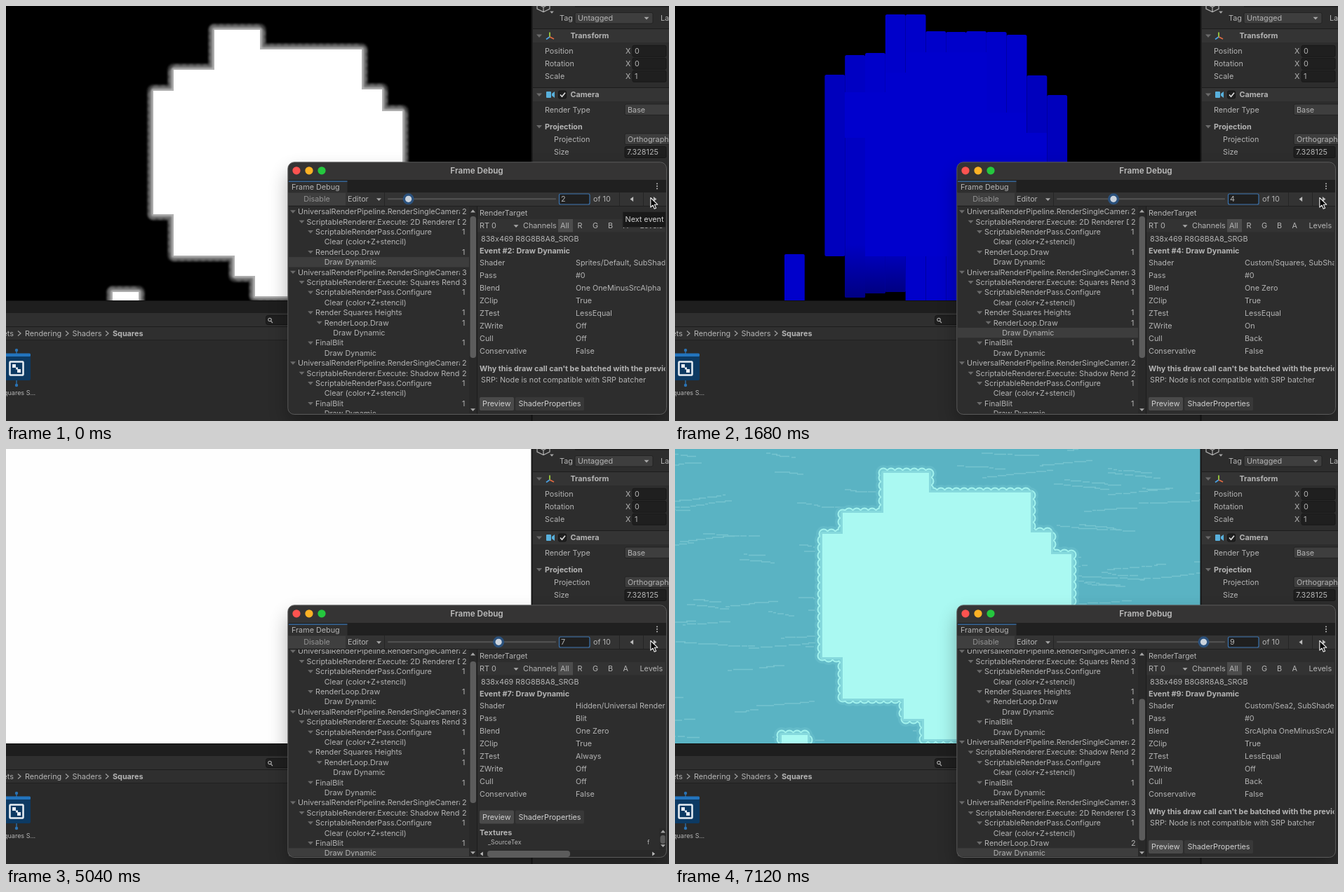
An HTML page that plays this animation: 945 by 592 pixels, repeating every 8 s.

```html
<!DOCTYPE html>
<html lang="en">
<head>
<meta charset="utf-8">
<title>Frame Debug</title>
<style>
html, body { margin: 0; width: 100%; height: 100%; overflow: hidden; background: #000; }
svg { display: block; width: 945px; height: 592px; }
text { font: 10.8px Inter, "Liberation Sans", sans-serif; fill: #b4b4b4; white-space: pre; }
.b { font-weight: 700; }
</style>
</head>
<body>
<svg id="stage" viewBox="0 0 945 592" xmlns="http://www.w3.org/2000/svg"></svg>
<script>
const LOOP = 8000, ROW = 14.4;
const stage = document.getElementById('stage');

// Drawing helpers; text is placed by the middle of its line.
const esc = s => String(s).replace(/&/g, '&amp;').replace(/</g, '&lt;');
const text = (x, y, s, attr = '') => `<text x="${x}" y="${y + 3.9}" ${attr}>${esc(s)}</text>`;
const bold = (x, y, s) => text(x, y, s, 'class="b"');
const rect = (x, y, w, h, fill, attr = '') =>
  `<rect x="${x}" y="${y}" width="${w}" height="${h}" fill="${fill}" ${attr}/>`;
const path = (d, attr) => `<path d="${d}" ${attr}/>`;
const dot = (x, y, r, fill) => `<circle cx="${x}" cy="${y}" r="${r}" fill="${fill}"/>`;
const down = (x, y, r = 3.5, c = '#a8a8a8') => path(`M${x - r} ${y - r / 2}h${2 * r}l${-r} ${r * 1.1}z`, `fill="${c}"`);
const up = (x, y) => path(`M${x - 3.5} ${y + 2}h7l-3.5 -4z`, 'fill="#a8a8a8"');
const side = (x, y, d, r = 3.5) => path(`M${x - d * r * .6} ${y - r}v${2 * r}l${d * r * 1.3} ${-r}z`, 'fill="#bcbcbc"');
const fold = (x, y) => down(x, y, 4, '#6b6b6b');
const clip = (id, x, y, w, h) => `<clipPath id="${id}">${rect(x, y, w, h, '#000')}</clipPath>`;
const field = (x, y, w, s) =>
  rect(x, y - 8, w, 16, '#1f1f1f', 'rx="2" stroke="#181818"') + text(x + 3, y, s);
const drop = (x, y, w, s) =>
  rect(x, y - 8, w, 15.5, '#3e3e3e', 'rx="2" stroke="#232323"') + text(x + 4, y, s);

function random(seed) {
  return () => {
    seed = seed + 0x6D2B79F5 | 0;
    let t = Math.imul(seed ^ seed >>> 15, 1 | seed);
    t = t + Math.imul(t ^ t >>> 7, 61 | t) ^ t;
    return ((t ^ t >>> 14) >>> 0) / 4294967296;
  };
}

// Scene pictures
const ISLAND = 'M297 34H362V62H507V119H536V150H565V414H355V385H326V356H239V297H210V121H239V91H297Z' +
  'M152 408H189V440H152Z';
const ring = (w, c, gap, attr = '') => path(ISLAND,
  `fill="none" stroke="${c}" stroke-width="${w}" stroke-linejoin="round" ` +
  (gap ? `stroke-linecap="round" stroke-dasharray="0 ${gap}" ` : '') + attr);
const backdrop = c => rect(0, 0, 750, 421, c);

function mask() {
  return backdrop('#000') + ring(17, '#3c3c3c', 0, 'filter="url(#soft)"') +
    ring(15, '#6a6a6a', 10, 'filter="url(#soft)"') + ring(6, '#b4b4b4', 0, 'filter="url(#soft)"') +
    path(ISLAND, 'fill="#fff"');
}

function heights() {
  const tops = [98, 70, 67, 12, 12, 36, 37, 36, 37, 41, 99, 127];
  const ends = [357, 416, 410, 408];
  const tint = i => i === 0 || i > 9 ? '#0000bd' : i === 1 ? '#0000c3' : '#0000ca';
  let s = backdrop('#000') + rect(156, 354, 28.8, 80, '#0000cb', 'rx="2"');
  tops.forEach((y, i) => {
    const x = 213.4 + i * 28.8, end = ends[i] || 440;
    s += rect(x, y, 28.9, end - y, tint(i), 'rx="2.5"');
    if (i > 0 && ends[i]) s += rect(x, 340, 28.9, end - 340, 'url(#deep)', 'rx="2"');
  });
  return s + path('M242 188V123H300V95H329V66H444V152H501V181H530V357H271V188Z', 'fill="#0000cd"');
}

function sea() {
  const rnd = random(7);
  let d = '';
  for (let i = 0; i < 120; i++) {
    d += `M${(rnd() * 790 - 40).toFixed()} ${(rnd() * 420).toFixed()}`;
    const slope = rnd() < .6 ? 1.5 : -1.5;
    for (let n = 2 + rnd() * 6; n > 0; n--) {
      d += `h${(4 + rnd() * 14).toFixed()}m${(rnd() * 5 - 2).toFixed()} ${rnd() < .75 ? slope : 0}`;
    }
  }
  return backdrop('#5ab3c3') + path(d, 'fill="none" stroke="#75c4cf" stroke-width="1.5"') +
    ring(22, '#64bbc9', 11) + ring(15, '#a2f2ed', 11) + ring(11, '#78ced5', 11) +
    ring(6, '#86d9dd') + path(ISLAND, 'fill="#aaf9f2"');
}

const scenes = {
  mask: mask(), black: backdrop('#000'), blue: heights(),
  white: backdrop('#fefefe'), purple: backdrop('#331052'), sea: sea()
};

// Call tree: [depth, label, count]
const call = (name, n) => [
  [0, 'UniversalRenderPipeline.RenderSingleCamera:', n],
  [1, `ScriptableRenderer.Execute: ${name}`, n],
  [2, 'ScriptableRenderPass.Configure', 1],
  [3, 'Clear (color+Z+stencil)']
];
const draw = depth => [depth, 'Draw Dynamic'];
const loop = (depth, n) => [depth, 'RenderLoop.Draw', n];
const blit = [2, 'FinalBlit', 1];
const rows = [
  ...call('2D Renderer Data', 2), loop(2, 1), draw(3),
  ...call('Squares Renderer', 3), [2, 'Render Squares Heights', 1], loop(3, 1), draw(4), blit, draw(3),
  ...call('Shadow Renderer', 2), blit, draw(3),
  ...call('2D Renderer Data', 3), loop(2, 2), draw(3), draw(3)
];

// Events by number: tree row, scene, and either a clear target or draw state
const LABELS = ['Shader', 'Pass', 'Blend', 'ZClip', 'ZTest', 'ZWrite', 'Cull', 'Conservative'];
const copy = ['Hidden/Universal Render Pipeline/Blit', 'Blit', 'One Zero', 'True', 'Always', 'Off', 'Off', 'False'];
const state = (shader, blend, write, cull) =>
  [shader + ', SubShader #0', '#0', blend, 'True', 'LessEqual', write, cull, 'False'];
const events = {
  2: { row: 5, scene: 'mask', props: state('Sprites/Default', 'One OneMinusSrcAlpha', 'Off', 'Off') },
  3: { row: 9, scene: 'black', target: '_CameraColorTexture' },
  4: { row: 12, scene: 'blue', props: state('Custom/Squares', 'One Zero', 'On', 'Back') },
  5: { row: 14, scene: 'blue', props: copy, textures: true },
  6: { row: 18, scene: 'white', target: '_CameraColorTexture' },
  7: { row: 20, scene: 'white', props: copy, textures: true },
  8: { row: 24, scene: 'purple', target: '<No name>' },
  9: { row: 26, scene: 'sea', props: state('Custom/Sea2', 'SrcAlpha OneMinusSrcAlpha', 'Off', 'Back') }
};

// [start ms, event, title only, scene still on screen, shadow spread]
const steps = [
  [0, 2], [300, 3, true, 'mask'], [360, 3, true], [420, 3],
  [1620, 4, true, 'black'], [1680, 4], [2760, 5], [3960, 6],
  [4980, 7, true], [5040, 7], [6110, 7, false, '', 11.5], [6170, 8], [7120, 9]
];

function tree(ev) {
  const scroll = Math.max(0, ev.row * ROW - 283.2);
  let s = rect(403, 293.3 + ev.row * ROW - scroll - 7.2, 257, ROW, '#3d3d3d');
  let names = '';
  rows.forEach(([depth, label, count], i) => {
    const x = 416 + depth * 12.55, y = 293.3 + i * ROW - scroll;
    if (y < 275 || y > 595) return;
    names += text(x, y, label);
    if (count) s += fold(x - 7, y) + text(650, y, count);
  });
  return `<g clip-path="url(#treeBox)">${s}<g clip-path="url(#nameBox)">${names}</g></g>` +
    rect(661.5, 300 + scroll * .62, 8.5, 202, '#5c5c5c', 'rx="4"');
}

function tabs(y) {
  return rect(675, y - 9.5, 49, 19, '#4a4a4a', 'rx="2"') + rect(726, y - 9.5, 98, 19, '#383838', 'rx="2"') +
    text(679, y, 'Preview', 'style="fill:#d0d0d0"') + text(730.5, y, 'ShaderProperties', 'style="fill:#d0d0d0"');
}

function details(n, ev, titleOnly) {
  const title = `Event #${n}: ${ev.props ? 'Draw Dynamic' : 'Clear (color+Z+stencil)'}`;
  if (titleOnly) return bold(672, 292.5, title);
  let s = rect(672, 304, 269, 18.5, '#333') + rect(787, 304, 21, 18.5, '#4c4c4c') + text(675, 295.5, 'RenderTarget');
  if (ev.target) s += text(ev.target[0] === '_' ? 811 : 812, 295.5, ev.target);
  s += text(675, 313.5, 'RT 0') + down(727, 314) + text(737, 313.5, 'Channels');
  ['All', 'R', 'G', 'B', 'A'].forEach((c, i) => s += text([790, 814.5, 836, 858, 879.5][i], 313.5, c));
  s += text(903.5, 313.5, 'Levels') +
    text(677, 332.5, `838x469 ${n < 8 ? 'R8G8B8A8' : 'B8G8R8A8'}_SRGB`) + bold(675, 349, title);
  if (ev.props) ev.props.forEach((v, i) => {
    const y = 366 + i * 17.95;
    s += text(675, y, LABELS[i]) + text(812, y, v);
  });
  if (ev.textures) {
    s += tabs(525) + bold(675, 547, 'Textures') +
      text(687, 560, '_SourceTex', 'style="font-size:8.8px"') + text(914, 560, 'f', 'style="font-size:8.8px"') +
      rect(931.5, 541, 9, 30, '#292929') + up(936.5, 545.5) + rect(932.5, 551, 8, 12, '#5c5c5c', 'rx="4"') + down(936.5, 566) +
      rect(672, 572, 268, 10, '#292929') + side(678, 577.5, -1, 3) + rect(686, 573, 118, 9, '#5c5c5c', 'rx="4"') + side(923, 577.5, 1, 3);
  } else if (ev.props) {
    s += bold(675, 517.5, "Why this draw call can't be batched with the previous one") +
      text(677, 533.5, 'SRP: Node is not compatible with SRP batcher') + tabs(567.5);
  }
  return `<g clip-path="url(#infoBox)">${s}</g>`;
}

function slider(n) {
  const x = 522.2 + 25.7 * n;
  return dot(x, 275.3, 8, '#2b517c') + dot(x, 275.3, 4.6, '#cbd3dc') + text(791, 275.5, n);
}

const tooltip = rect(879, 293.5, 61.5, 22, '#191919', 'stroke="#2a2a2a"') + text(882.5, 304.5, 'Next event', 'style="fill:#d2d2d2"');

// Fixed parts
function inspector() {
  const name = (x, y, s) => text(x, y, s);
  let s = rect(749, 0, 196, 592, '#2d2d2d') + rect(748.5, 0, 2, 592, '#161616');
  s += path('M757 -3v7l9 4.5l9 -4.5v-7M757 -3l9 4.5l9 -4.5M766 1.5v7', 'fill="none" stroke="#aaa" stroke-width="1.3"') +
    down(778, 9, 2.8) + rect(811, -4, 134, 5.5, '#1f1f1f') +
    name(789, 17.5, 'Tag') + drop(811, 17.5, 111, 'Untagged') + down(913, 17.5) + name(933, 17.5, 'Layer');
  [33, 117].forEach(y => s += rect(751, y, 194, 19, '#343434') + rect(751, y - 1, 194, 1, '#1c1c1c'));
  s += fold(760, 42.5) + path('M775 44V37.5', 'stroke="#9ccc3c" stroke-width="1.8"') +
    path('M775 44L770 47.5', 'stroke="#4a9fe0" stroke-width="1.8"') + path('M775 44L781 47', 'stroke="#e06a42" stroke-width="1.8"') +
    bold(804.5, 42.5, 'Transform');
  ['Position', 'Rotation', 'Scale'].forEach((label, i) => {
    const y = 64.3 + i * 18;
    s += name(768, y, label) + name(883, y, 'X') + field(893, y, 48, i < 2 ? 0 : 1);
  });
  s += fold(760, 126.5) + rect(770, 122, 7, 9, '#58b0dc', 'rx="1"') + path('M778 125l4 -3v9l-4 -3z', 'fill="#58b0dc"') +
    rect(787.5, 121, 11, 11, '#1f1f1f', 'rx="2" stroke="#151515"') +
    path('M790 126.5l2.5 2.7l4.5 -5.5', 'fill="none" stroke="#ddd" stroke-width="1.6"') + bold(804.5, 126.5, 'Camera') +
    name(768, 148, 'Render Type') + drop(882, 148, 70, 'Base') + fold(760, 172) + bold(768, 172.5, 'Projection') +
    name(781, 190, 'Projection') + drop(882, 190, 70, 'Orthographic') + name(781, 208.5, 'Size') + field(882, 208.5, 59, '7.328125');
  return s;
}

function project() {
  let s = rect(0, 420, 749, 172, '#2a2a2a') + rect(0, 420, 749, 18, '#1e1e1e') + rect(0, 420, 749, 1, '#111') +
    rect(0, 438, 749, 19, '#2f2f2f') + rect(0, 457, 749, 1, '#1d1d1d') + rect(0, 458, 749, 18, '#2f2f2f') + rect(0, 476, 749, 1, '#202020') +
    rect(370.5, 441.5, 200, 13, '#202020', 'rx="3" stroke="#161616"') +
    path('M377.4 449.4l2.6 2.6M378.2 447.5a2.2 2.2 0 1 1 -4.4 0a2.2 2.2 0 1 1 4.4 0', 'fill="none" stroke="#b4b4b4" stroke-width="1.1"');
  s += text(11, 467, 'Assets', 'text-anchor="end"') + text(27, 467, 'Rendering') + text(94.5, 467, 'Shaders') + bold(152, 467, 'Squares');
  [17, 85, 142].forEach(x => s += path(`M${x} 463.5l4 3.5l-4 3.5`, 'fill="none" stroke="#a0a0a0" stroke-width="1.2"'));
  s += path('M15 491V543', 'stroke="#2b73b4" stroke-width="1.3"') + dot(15, 491, 2.2, '#2b73b4') + dot(15, 541, 2.2, '#2b73b4') +
    rect(-5, 496, 40, 38, '#0d3a63', 'rx="2"') + rect(-5, 495.5, 40, 4.5, '#2374bd', 'rx="1.5"') +
    rect(5.5, 507.5, 19, 19, 'none', 'rx="1" stroke="#e8eef4" stroke-width="2.5"') +
    rect(9, 511, 5, 5, '#e8eef4') + rect(16, 518, 5, 5, '#e8eef4') + rect(14, 515.5, 3, 3, '#e8eef4') +
    text(-3, 551, 'quares S...', 'style="font-size:9px"');
  return s;
}

function frame() {
  return rect(402, 223, 539.5, 359.5, '#2d2d2d', 'rx="9"') +
    path('M402 248V232a9 9 0 0 1 9 -9H932.5a9 9 0 0 1 9 9V248z', 'fill="#353434"') + rect(402, 248, 539.5, 18, '#202020') +
    dot(414, 234.8, 5.6, '#fd5350') + dot(432, 234.8, 5.6, '#fdb225') + dot(450, 234.8, 5.6, '#25c73e') +
    text(671, 234.8, 'Frame Debug', 'text-anchor="middle" style="font-size:11.7px;font-weight:600;fill:#bdbdbd"') +
    rect(403, 250, 83.5, 16, '#2f2f2f') + rect(403, 249.5, 83.5, 1.3, '#3a72ad') + text(407, 258.5, 'Frame Debug') +
    [253.5, 257, 260.5].map(y => dot(928, y, 1, '#bbb')).join('') +
    rect(402, 266, 539.5, 19, '#333') + rect(402, 285, 539.5, 1, '#1f1f1f') + rect(403, 266.5, 81, 18, '#3f3f3f') +
    text(443, 275.5, 'Disable', 'text-anchor="middle" style="fill:#929292"') + text(487, 275.5, 'Editor') + down(531.5, 276) +
    rect(539, 266, 1, 19, '#252525') + rect(544, 274.3, 240, 2, '#535353', 'rx="1"') +
    rect(788.5, 268, 43.5, 15, '#1f1f1f', 'rx="2" stroke="#3b73ad" stroke-width="1.2"') + text(837, 275.5, 'of 10') +
    rect(874, 266, 1, 19, '#252525') + rect(908, 266, 1, 19, '#252525') + side(892, 275.5, -1) + side(925, 275.5, 1) +
    rect(660, 286, 11, 295, '#292929') + rect(671, 286, 1, 296, '#1c1c1c') + up(665.5, 292.5) + down(665.5, 576);
}

const cursor = path('M918.8 273.5v13.6l3.2 -3l2.2 5.1l2.4 -1l-2.2 -5h4.3z', 'fill="#050505" stroke="#f2f2f2" stroke-width="1.1" stroke-linejoin="round"');
const edge = rect(401.8, 222.8, 539.7, 359.7, 'none', 'rx="9" stroke="#5b5b5b"');

stage.innerHTML = `<defs>
  <filter id="soft" x="-10%" y="-10%" width="120%" height="120%"><feGaussianBlur stdDeviation="1.7"/></filter>
  <filter id="haze" x="-20%" y="-20%" width="140%" height="150%"><feGaussianBlur id="spread" stdDeviation="14"/></filter>
  <linearGradient id="deep" x1="0" y1="0" x2="0" y2="1"><stop offset="0" stop-color="#000082" stop-opacity="0"/>
    <stop offset="1" stop-color="#000082"/></linearGradient>
  ${clip('sceneBox', 0, 0, 749, 420)}${clip('treeBox', 402, 286, 258, 295)}
  ${clip('nameBox', 402, 286, 245, 295)}${clip('infoBox', 672, 286, 267.5, 296)}</defs>
  ${rect(0, 0, 945, 592, '#000')}${project()}
  <g id="scene" clip-path="url(#sceneBox)"></g>
  ${inspector()}
  ${rect(402, 237, 539, 359, '#000', 'rx="9" opacity=".3" filter="url(#haze)"')}
  ${frame()}<g id="panel"></g>${edge}<g id="tip">${tooltip}</g>${cursor}`;

const part = id => document.getElementById(id);
let shown = -1, sceneShown = '';

function render(ms) {
  let i = steps.length - 1;
  while (steps[i][0] > ms) i--;
  if (i === shown) return;
  shown = i;
  const [, n, titleOnly, held, spread = 14] = steps[i], ev = events[n];
  const scene = held || ev.scene;
  if (scene !== sceneShown) part('scene').innerHTML = scenes[sceneShown = scene];
  part('panel').innerHTML = slider(n) + tree(ev) + details(n, ev, titleOnly);
  part('spread').setAttribute('stdDeviation', spread);
  part('tip').style.display = i ? 'none' : '';
}

const start = performance.now();
function tick() {
  render((performance.now() - start) % LOOP);
  requestAnimationFrame(tick);
}
tick();
</script>
</body>
</html>
```
